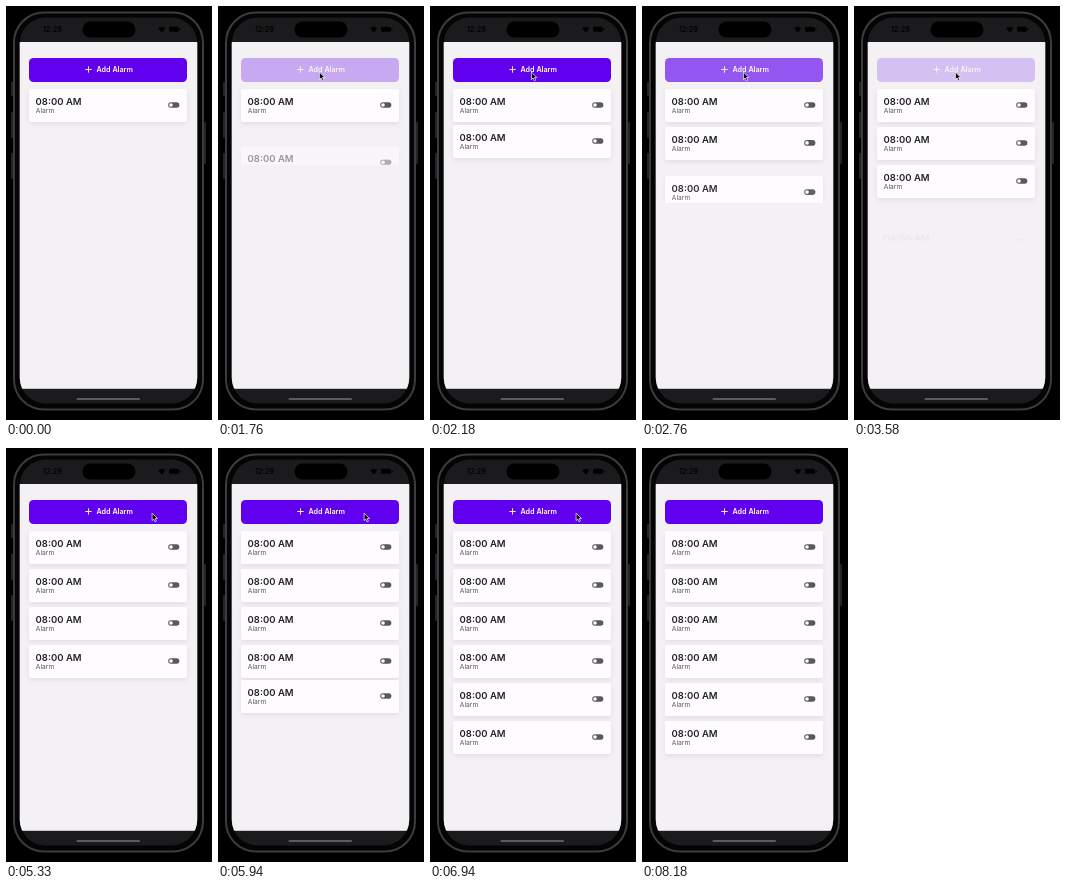
An HTML page for the animation above (8.45 s loop, 206x414 px).

```html
<!DOCTYPE html>
<html lang="en">
<head>
<meta charset="utf-8">
<title>Alarm list</title>
<style>
  html, body { margin: 0; width: 100%; height: 100%; overflow: hidden; background: #000; }
  body { font-family: Inter, Roboto, sans-serif; }
  #stage { position: relative; width: 206px; height: 414px; overflow: hidden; background: #000; }
  #stage > * { position: absolute; }
  svg { display: block; }
  #phone, #list { left: 0; top: 0; width: 206px; height: 414px; }
  #add {
    left: 23.2px; top: 52.2px; width: 158px; height: 23.5px;
    border-radius: 4.5px; background: #6000ee; color: #fff;
    font: 600 7.2px/23.5px Inter, Roboto, sans-serif;
  }
  #add svg { position: absolute; left: 55.8px; top: 8.2px; }
  #add span { position: absolute; left: 67.3px; top: 0; white-space: nowrap; }
  .card {
    position: absolute; left: 23.2px; width: 158px; height: 33px;
    border-radius: 2px; background: #fefcff; box-shadow: 0 2px 5px rgba(0, 0, 0, .08);
  }
  .card * { position: absolute; white-space: nowrap; }
  .card b { left: 6.4px; top: 6.9px; font-size: 9.5px; line-height: 12px; font-weight: 600; color: #222226; }
  .card i { left: 6.6px; top: 18.2px; font-size: 6.7px; line-height: 8px; font-style: normal; color: #58585c; }
  .card svg { left: 138.9px; top: 13.4px; }
  #cursor { left: 0; top: 0; }
</style>
</head>
<body>
<div id="stage">
  <svg id="phone" viewBox="0 0 206 414">
    <clipPath id="screen"><rect x="13.7" y="11.5" width="177.6" height="386" rx="26"/></clipPath>
    <g fill="#242426">
      <rect x="5" y="76" width="3" height="14" rx="1"/>
      <rect x="5" y="106" width="3" height="26" rx="1"/>
      <rect x="5" y="147" width="3" height="26" rx="1"/>
      <rect x="197" y="116" width="3" height="42" rx="1"/>
    </g>
    <rect x="8" y="6.5" width="189" height="397" rx="30" fill="#040404" stroke="#3c3c3f" stroke-width="2"/>
    <g clip-path="url(#screen)">
      <rect x="13" y="11" width="179" height="388" fill="#1b1a1d"/>
      <rect x="13" y="36" width="179" height="346.8" fill="#f3f1f4"/>
    </g>
    <rect x="76.5" y="15.5" width="53" height="16" rx="8" fill="#000"/>
    <text x="37" y="26" font-family="Inter, Roboto, sans-serif" font-size="7.2" font-weight="600" fill="#000">12:29</text>
    <path d="M152.2 22.2q3.6-3 7.2 0l-3.6 4.2z" fill="#000"/>
    <rect x="163" y="20.8" width="10" height="5" rx="1.5" fill="#000"/>
    <rect x="173.5" y="22.3" width="1" height="2" rx=".5" fill="#000"/>
    <rect x="70.5" y="392" width="63.5" height="2" rx="1" fill="#5c5c5f"/>
  </svg>

  <div id="add">
    <svg width="7" height="7" viewBox="0 0 7 7"><path d="M3.5 .3v6.4M.3 3.5h6.4" stroke="#fff" stroke-width=".9"/></svg>
    <span>Add Alarm</span>
  </div>

  <div id="list"></div>

  <svg id="cursor" width="8" height="11" viewBox="-1 -1 8 11">
    <path d="M0 0v7.4l1.7-1.5 1.2 2.8 1.4-.6-1.2-2.7h2.3z" fill="#000" stroke="#fff" stroke-width=".7"/>
  </svg>
</div>

<script>
  const LOOP = 8450;
  const TOP = 82.7, PITCH = 38, HEIGHT = 33;
  const DROP = 22.6;                              // start offset of a new card
  const PRESS = 150, RELEASE = 250, DIM = 0.2;    // button feedback
  const taps = [1700, 2630, 3575, 5510, 6335];    // each release adds a card

  const $ = id => document.getElementById(id);
  const list = $('list'), add = $('add'), cursor = $('cursor');

  const clamp = v => Math.min(1, Math.max(0, v));
  const mix = (a, b, k) => a + (b - a) * k;
  const easeInOut = k => k < .5 ? 2 * k * k : 1 - 2 * (1 - k) * (1 - k);

  // Damped spring from 1 to 0: stiffness 100, damping 10, mass 1
  const spring = ms => {
    const s = ms / 1000, w = Math.sqrt(75);
    return Math.exp(-5 * s) * (Math.cos(w * s) + 5 / w * Math.sin(w * s));
  };

  const cards = [-Infinity, ...taps].map((born, i) => {
    const el = document.createElement('div');
    el.className = 'card';
    el.style.top = TOP + PITCH * i + 'px';
    el.innerHTML = '<b>08:00 AM</b><i>Alarm</i>' +
      '<svg width="12" height="6" viewBox="0 0 12 6">' +
      '<rect x=".2" y=".2" width="11.2" height="5.6" rx="2.8" fill="#59595e"/>' +
      '<circle cx="3" cy="3" r="1.8" fill="#fff"/></svg>';
    list.append(el);
    return { el, born };
  });

  // Cursor legs: start, end, from, to
  const legs = [
    [30, 360, [4, 245], [101.4, 66.1]],
    [4450, 4950, [101.4, 66.1], [146.1, 65.1]],
    [8000, 8170, [146.1, 65.1], [198, 42]]
  ];

  function buttonOpacity(t) {
    for (const tap of taps) {
      if (t < tap - PRESS || t > tap + RELEASE) continue;
      return t < tap
        ? mix(1, DIM, easeInOut((t - tap + PRESS) / PRESS))
        : mix(DIM, 1, easeInOut((t - tap) / RELEASE));
    }
    return 1;
  }

  function drawCursor(t) {
    const visible = t >= legs[0][0] && t < legs[2][1];
    cursor.style.display = visible ? 'block' : 'none';
    if (!visible) return;
    const [start, end, from, to] = legs.filter(leg => t >= leg[0]).pop();
    const k = easeInOut(clamp((t - start) / (end - start)));
    const x = mix(from[0], to[0], k) - 1, y = mix(from[1], to[1], k) - 1;
    cursor.style.transform = `translate(${x}px, ${y}px)`;
  }

  function draw(t) {
    let count = 0;
    for (const { el, born } of cards) {
      const age = t - born, shown = age >= 0;
      el.style.display = shown ? 'block' : 'none';
      if (!shown) continue;
      count++;
      const settled = age > 1200;
      el.style.opacity = clamp(age / 140);
      el.style.transform = settled ? 'none' : `translateY(${DROP * spring(age)}px)`;
    }
    // The list ends just below its last resting card
    const bottom = TOP + PITCH * (count - 1) + HEIGHT + 5;
    list.style.clipPath = `inset(0 0 ${414 - bottom}px 0)`;
    add.style.opacity = buttonOpacity(t);
    drawCursor(t);
  }

  const origin = performance.now();
  function tick() {
    draw((performance.now() - origin) % LOOP);
    requestAnimationFrame(tick);
  }
  tick();
</script>
</body>
</html>
```
